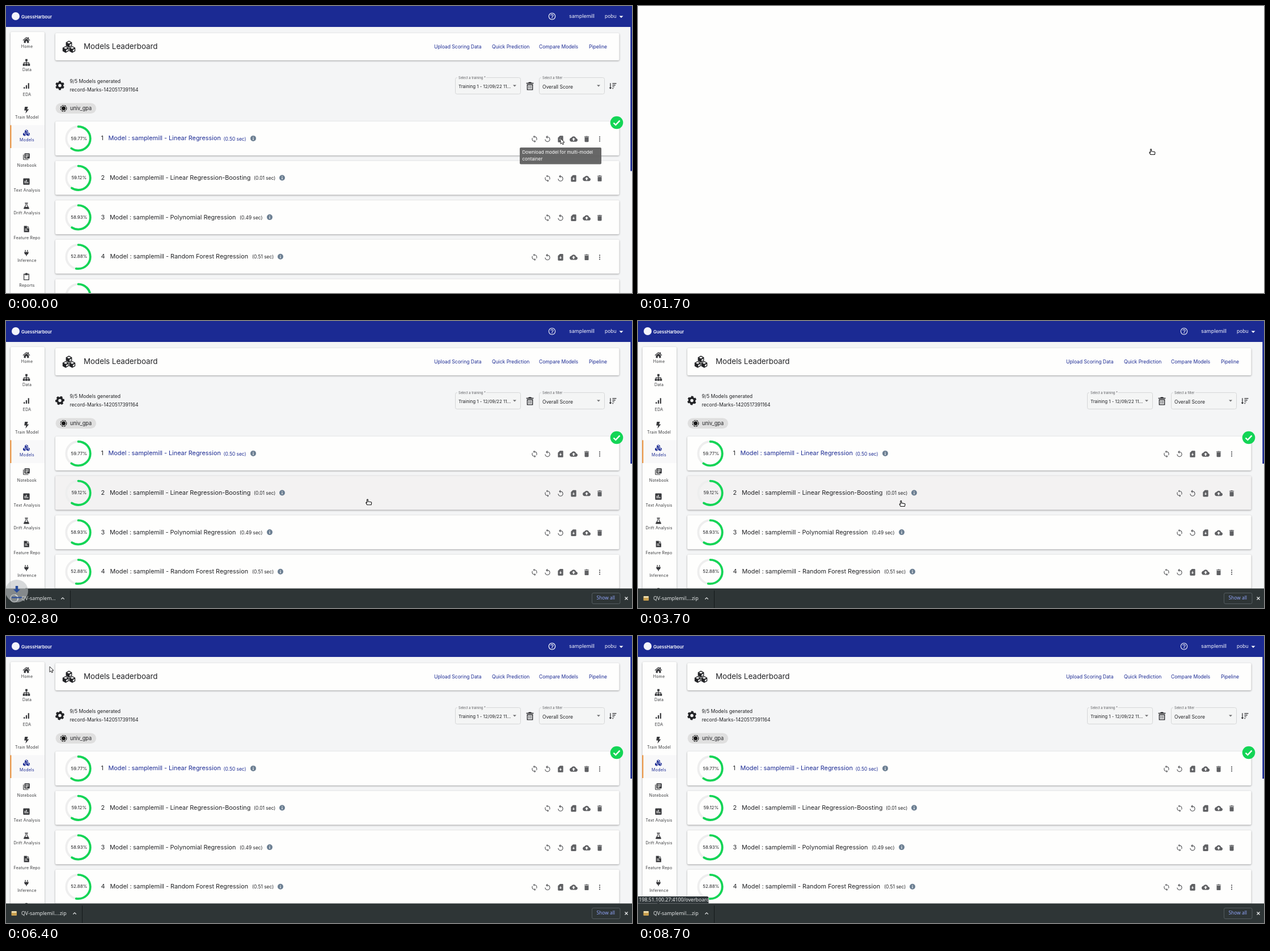
Animation, 1104 px wide and 507 px high, one loop 8800 ms. Source, as an HTML page with a canvas:

```html
<!DOCTYPE html>
<html lang="en">
<head>
<meta charset="utf-8">
<title>Models Leaderboard</title>
<style>
html, body { margin: 0; width: 100%; height: 100%; overflow: hidden; background: #fefefd; }
canvas { display: block; }
</style>
</head>
<body>
<canvas id="stage" width="1104" height="507"></canvas>
<script>
const ctx = document.getElementById('stage').getContext('2d');
const W = 1104, H = 507, LOOP = 8800, STEP = 100;
const SANS = 'Inter, sans-serif', UI = '"Noto Sans", sans-serif';
const NAVY = '#1b2a93', PAPER = '#fefefd', PAGE = '#f4f5f6', INK = '#222326', GREEN = '#13d556';
const BLANK_FROM = 1500, BLANK_TO = 2700, BAR_AT = 2800, DONE_AT = 3400;

// Icons on a 24 unit grid.
const ICONS = {
  loop: 'M12 4V1L8 5l4 4V6c3.31 0 6 2.69 6 6 0 1.01-.25 1.97-.7 2.8l1.46 1.46C19.54 15.03 20 13.57 20 12c0-4.42-3.58-8-8-8zm0 14c-3.31 0-6-2.69-6-6 0-1.01.25-1.97.7-2.8L5.24 7.74C4.46 8.97 4 10.43 4 12c0 4.42 3.58 8 8 8v3l4-4-4-4v3z',
  replay: 'M12 5V1L7 6l5 5V7c3.31 0 6 2.69 6 6s-2.69 6-6 6-6-2.69-6-6H4c0 4.42 3.58 8 8 8s8-3.58 8-8-3.58-8-8-8z',
  card: 'M18 2h-8L4 8v12c0 1.1.9 2 2 2h12c1.1 0 2-.9 2-2V4c0-1.1-.9-2-2-2zm-6 15l-4-4h3V9h2v4h3z',
  cloud: 'M19.35 10.04C18.67 6.59 15.64 4 12 4 9.11 4 6.6 5.64 5.35 8.04 2.34 8.36 0 10.91 0 14c0 3.31 2.69 6 6 6h13c2.76 0 5-2.24 5-5 0-2.64-2.05-4.78-4.65-4.96zM14 13v4h-4v-4H7l5-5 5 5h-3z',
  bin: 'M6 19c0 1.1.9 2 2 2h8c1.1 0 2-.9 2-2V7H6v12zM19 4h-3.5l-1-1h-5l-1 1H5v2h14V4z',
  more: 'M12 8a2 2 0 1 0 0-4 2 2 0 0 0 0 4zM12 14a2 2 0 1 0 0-4 2 2 0 0 0 0 4zM12 20a2 2 0 1 0 0-4 2 2 0 0 0 0 4z',
  info: 'M12 2a10 10 0 1 0 0 20 10 10 0 0 0 0-20zM13.3 17.5h-2.6V11h2.6zM13.300 9h-2.600V6.500h2.600z',
  help: 'M11 18h2v-2h-2v2zm1-16C6.480 2 2 6.480 2 12s4.480 10 10 10 10-4.480 10-10S17.520 2 12 2zm0 18c-4.410 0-8-3.590-8-8s3.590-8 8-8 8 3.590 8 8-3.590 8-8 8zm0-14c-2.210 0-4 1.790-4 4h2c0-1.100.900-2 2-2s2 .900 2 2c0 2-3 1.750-3 5h2c0-2.250 3-2.500 3-5 0-2.210-1.790-4-4-4z',
  home: 'M12 3 1 12.500l1.300 1.500L12 5.600l9.700 8.400 1.300-1.500-4-3.500V4h-3v2.500zM12 7.200 4.500 13.700V21H10v-5h4v5h5.500v-7.300z',
  tree: 'M9 2h6v6h-2v3h7v4h2v6h-6v-6h2v-2h-5v2h2v6H9v-6h2v-2H6v2h2v6H2v-6h2v-4h7V8H9z',
  bars: 'M3 16h4v5H3zM10 10h4v11h-4zM17 3h4v18h-4z',
  bolt: 'M7 1h10l-3 8h6L9 23l2-10H5z',
  books: 'M4 6H2v14c0 1.100.900 2 2 2h14v-2H4V6zm16-4H8c-1.100 0-2 .900-2 2v12c0 1.100.900 2 2 2h12c1.100 0 2-.900 2-2V4c0-1.100-.900-2-2-2zm-1 9H9V9h10v2zm-4 4H9v-2h6v2zm4-8H9V5h10v2z',
  chart: 'M19 3H5c-1.100 0-2 .900-2 2v14c0 1.100.900 2 2 2h14c1.100 0 2-.900 2-2V5c0-1.100-.900-2-2-2zM9 17H7v-7h2v7zm4 0h-2V7h2v10zm4 0h-2v-4h2v4z',
  flask: 'M7 2h10v2h-2v5l6 11c.5 1-.2 2-1.300 2H4.300C3.200 22 2.500 21 3 20L9 9V4H7zM11 4v5.500L8 15h8l-3-5.500V4z',
  file: 'M4 2h10v7h7v13H4zM15.500 2l5.500 5.500h-5.500zM7 11v2h7v-2zM7 15v2h9v-2z',
  plug: 'M7 2h2.500v6H7zM14.500 2H17v6h-2.500zM4 9h16v2h-1v2c0 3-2 5-5.500 5.700V23h-3v-4.300C7 18 5 16 5 13v-2H4z',
  clip: 'M9 2h6v2h5v18H4V4h5zM6 6v14h12V6h-2v2H8V6z',
  trash: 'M9 2h6l1 2h5v2H3V4h5zM4.500 7.500h15V22h-15zM6.500 9.500V20h11V9.500zM9 11h1.500v7.500H9zM13.500 11H15v7.500h-1.500z',
  sort: 'M4 4h2v13h3l-4 5-4-5h3zM11 4h12v2H11zM11 9h9v2h-9zM11 14h6v2h-6zM11 19h3v2h-3z',
  arrow: 'M0 0V11L2.600 8.700 4.300 12.300 6.200 11.400 4.600 7.900H8z',
  hand: 'M-.9 .9C-.9-.3 .9-.3 .9 .9V4L5.800 4.800C7 5 7.400 5.700 7.200 6.700L6.500 9.800H-.6L-2.500 6.600C-3 5.600-2 5-1.300 5.700L-.9 6.100z'
};
for (const name in ICONS) ICONS[name] = new Path2D(ICONS[name]);

const MENU = [
  ['Home', 'home', 60, 72, 14], ['Data', 'tree', 100, 112.5, 15], ['EDA', 'bars', 141, 157, 13],
  ['Train Model', 'bolt', 184, 197, 13], ['Models', 'cubes', 224, 237, 6],
  ['Notebook', 'books', 266, 281.5, 14], ['Text Analysis', 'chart', 310, 325.5, 15],
  ['Drift Analysis', 'flask', 353, 365.5, 13], ['Feature Repo', 'file', 394, 409.5, 13],
  ['Inference', 'plug', 436, 450, 12], ['Reports', 'clip', 478, 494, 15]
];
const ROWS = [
  { score: 59.77, name: 'Linear Regression', sec: '0.50', x: 180.5, secX: 383.5, infoX: 436, more: true },
  { score: 59.12, name: 'Linear Regression-Boosting', sec: '0.01', x: 183, secX: 437, infoX: 487 },
  { score: 58.93, name: 'Polynomial Regression', sec: '0.49', x: 183, secX: 412, infoX: 465 },
  { score: 52.88, name: 'Random Forest Regression', sec: '0.51', x: 183.5, secX: 434, infoX: 484, more: true },
  { score: 50.4, name: 'Decision Tree Regression', sec: '0.48', x: 183.5, secX: 434, infoX: 484 }
];
// Cursor stops: time, x, y, easing towards this stop.
const linear = s => s, smooth = s => s * s * (3 - 2 * s), slowing = s => 1 - (1 - s) ** 1.7;
const PATH = [
  [0, 978, 234, linear], [1400, 978, 234, linear], [2600, 684.5, 309, linear], [2800, 637.5, 315, linear],
  [4700, 376, 319, slowing], [6400, 77, 54, smooth], [7000, -14, 58, linear]
];

function text(str, x, y, size, color = INK, opt = {}) {
  ctx.font = `${opt.weight || 400} ${size}px ${opt.font || SANS}`;
  ctx.textAlign = opt.align || 'left';
  ctx.textBaseline = 'middle';
  ctx.letterSpacing = (opt.spacing || 0) + 'px';
  ctx.fillStyle = color;
  ctx.fillText(str, x, y);
}

function icon(name, x, y, size, color) {
  ctx.save();
  ctx.translate(x - size / 2, y - size / 2);
  ctx.scale(size / 24, size / 24);
  ctx.fillStyle = color;
  ctx.fill(ICONS[name], 'evenodd');
  ctx.restore();
}

function box(x, y, w, h, r, fill, stroke) {
  ctx.beginPath();
  ctx.roundRect(x, y, w, h, r);
  if (fill) { ctx.fillStyle = fill; ctx.fill(); }
  if (stroke) { ctx.strokeStyle = stroke; ctx.lineWidth = 1; ctx.stroke(); }
}

function panel(x, y, w, h, fill = PAPER) {
  ctx.save();
  ctx.shadowColor = 'rgba(0,0,0,.36)';
  ctx.shadowBlur = 3;
  ctx.shadowOffsetY = 1;
  box(x, y, w, h, 2, fill);
  ctx.restore();
}

function disc(x, y, r, color) {
  ctx.beginPath();
  ctx.arc(x, y, r, 0, Math.PI * 2);
  ctx.fillStyle = color;
  ctx.fill();
}

function ring(x, y, r, width, color, from = 0, part = 1) {
  ctx.beginPath();
  ctx.arc(x, y, r, from, from + part * Math.PI * 2);
  ctx.strokeStyle = color;
  ctx.lineWidth = width;
  ctx.stroke();
}

function line(color, width, ...points) {
  ctx.beginPath();
  for (let i = 0; i < points.length; i += 2) ctx.lineTo(points[i], points[i + 1]);
  ctx.strokeStyle = color;
  ctx.lineWidth = width;
  ctx.stroke();
}

function poly(color, ...points) {
  ctx.beginPath();
  for (let i = 0; i < points.length; i += 2) ctx.lineTo(points[i], points[i + 1]);
  ctx.fillStyle = color;
  ctx.fill();
}

function cube(x, y, r, color) {
  const w = r * .9, h = r / 2;
  poly(color, x, y - r, x + w, y - h, x + w, y + h, x, y + r, x - w, y + h, x - w, y - h);
  poly(PAPER, x, y - r * .72, x + w * .62, y - h * .86, x, y - r * .16, x - w * .62, y - h * .86);
  poly(PAPER, x + w * .2, y + r * .16, x + w * .76, y - h * .2, x + w * .76, y + h * .7, x + w * .2, y + r * .62);
}

function cubes(x, y, r, color) {
  cube(x, y - r * .78, r, color);
  cube(x - r * .97, y + r * .78, r, color);
  cube(x + r * .97, y + r * .78, r, color);
}

function gear(x, y, angle) {
  const teeth = 6, pitch = Math.PI * 2 / teeth;
  ctx.beginPath();
  for (let i = 0; i < teeth; i++) {
    const mid = angle - Math.PI / 2 + i * pitch;
    ctx.arc(x, y, 8, mid - .24, mid + .24);
    ctx.arc(x, y, 6.2, mid + .36, mid + pitch - .36);
  }
  ctx.closePath();
  ctx.moveTo(x + 2.7, y);
  ctx.arc(x, y, 2.7, 0, Math.PI * 2);
  ctx.fillStyle = INK;
  ctx.fill('evenodd');
}

function select(x, label, labelWidth, value, size) {
  box(x + .5, 126.5, 115, 29, 3, '#f4f5f5', '#d5d6d7');
  ctx.fillStyle = PAGE;
  ctx.fillRect(x + 4, 125, labelWidth, 3);
  text(label, x + 6, 127.5, 5.7, '#5c5d60');
  text(value, x + 6, 143, size);
  poly('#6b6c6e', x + 102, 139.5, x + 108, 139.5, x + 105, 142.5);
}

function header(t) {
  ctx.fillStyle = NAVY;
  ctx.fillRect(0, 0, W, 37);
  disc(17, 18, 7, '#f3f3fa');
  text('GuessHarbour', 27, 19.5, 7.7, '#fff', { weight: 600 });
  ctx.globalAlpha = .92 + .08 * Math.sin(t / 1000 * Math.PI * 2);
  icon('help', 963, 18.3, 15, '#fff');
  ctx.globalAlpha = 1;
  text('samplemill', 993, 18.5, 9, '#f2f3fb');
  text('pobu', 1056, 18.5, 8.5, '#f2f3fb');
  poly('#fff', 1081.5, 17.5, 1088.5, 17.5, 1085, 21);
}

function sidebar() {
  panel(8, 46, 60, 470);
  ctx.fillStyle = '#f8f8f9';
  ctx.fillRect(8, 210.5, 60, 40.5);
  ctx.fillStyle = '#ee8522';
  ctx.fillRect(7.5, 210.5, 1.8, 40.5);
  for (const [label, name, iconY, labelY, size] of MENU) {
    const color = name === 'cubes' ? NAVY : '#37383b';
    if (name === 'cubes') cubes(36, iconY, 3.2, color);
    else icon(name, 36, iconY, size, color);
    text(label, 37, labelY, 7, color, { align: 'center', spacing: .25 });
  }
}

function topPanel(t) {
  panel(87, 48, 994.5, 48);
  cubes(111, 72, 6, INK);
  text('Models Leaderboard', 137, 72, 13.3);
  [['Upload Scoring Data', 755], ['Quick Prediction', 857], ['Compare Models', 940], ['Pipeline', 1028]]
    .forEach(([label, x]) => text(label, x, 72.5, 8.55, NAVY));

  gear(95, 140.5, t / 2000 * Math.PI * 2);
  text('9/5 Models generated', 112.5, 133, 8.6);
  text('record-Marks-1420517391164', 112.5, 148, 8.6);
  select(792, 'Select a training *', 51, 'Training 1 - 12/09/22 11...', 7.9);
  icon('trash', 924, 141.5, 17, INK);
  select(940, 'Select a filter', 39, 'Overall Score', 8.5);
  icon('sort', 1070, 141, 14, INK);

  box(87.5, 171.5, 71.5, 18.5, 9.25, '#dfdfdf');
  disc(101.5, 180.8, 3.5, '#151515');
  ctx.setLineDash([3.2, 1.1]);
  ring(101.5, 180.8, 5.3, 1.2, '#151515');
  ctx.setLineDash([]);
  text('univ_gpa', 113, 181, 9.2);
}

const rowTop = i => 204 + i * 69.6;

function row(data, i, hovered) {
  const top = rowTop(i), y = top + 30.2;
  panel(87, top, 994.5, 60, hovered ? '#f3f2f2' : PAPER);
  ring(127.5, y, 21.2, 3.8, '#eeeeee');
  ctx.lineCap = 'round';
  ring(127.5, y, 21.2, 3.8, GREEN, -Math.PI / 2, data.score / 100);
  ctx.lineCap = 'butt';
  text(data.score.toFixed(2) + '%', 128.8, y, 7.9, INK, { align: 'center' });

  const color = i === 0 ? NAVY : INK;
  text(i + 1, 167.5, y, 10.85);
  text('Model : samplemill - ' + data.name, data.x, y, 10.85, color);
  text(`(${data.sec} sec)`, data.secX, y + .8, 8.4, color);
  icon('info', data.infoX, y - .3, 12, '#6c7f92');

  const actions = ['loop', 'replay', 'card', 'cloud', 'bin'];
  if (data.more) actions.push('more');
  actions.forEach((name, n) => icon(name, 1047 - 23 * (actions.length - 1 - n), y + .8, 14, '#5f6063'));
}

function tooltip() {
  box(906, 250, 144, 29.5, 2, 'rgba(97,97,97,.96)');
  text('Download model for multi-model', 910.5, 259, 8.05, '#fff');
  text('container', 910.5, 270.3, 8.05, '#fff');
}

function archive(x, y) {
  box(x - 4.5, y - 4, 9.5, 8, 1, '#c99f4e');
  box(x - 4, y - 4, 8.5, 3, 1, '#ecdcae');
}

function downloadBar(t) {
  const done = t >= DONE_AT, edge = done ? 134.5 : 113.5, chevron = edge - 13.5;
  ctx.fillStyle = '#2e3536';
  ctx.fillRect(0, 472.5, W, 35);
  line('#151a1b', 1, edge, 476, edge, H);
  line('#dfe2e3', 1.2, chevron - 2.7, 491.5, chevron, 488.8, chevron + 2.7, 491.5);

  if (done) {
    archive(14, 490);
    const pulse = (t - 3700) / 2500;
    if (pulse > 0 && pulse < 1) {
      ctx.globalAlpha = (1 - Math.cos(pulse * 10 * Math.PI)) / 2;
      ring(14.5, 490, 6.6, 1.6, '#dfe3e4');
      ctx.globalAlpha = 1;
    }
  } else {
    ring(14.5, 490, 6.6, 1.5, '#aeb3b5');
    ring(14.5, 490, 6.6, 1.8, '#f2f4f4', t / 160, .3);
  }
  text(done ? 'QV-samplemil....zip' : 'QV-samplem…', 27, 490, 8.9, '#e5e8e8', { font: UI });

  box(1033.5, 480.5, 49.5, 19, 2.5, null, '#535b5f');
  text('Show all', 1041.5, 490, 8.4, '#8fa3f8', { font: UI, weight: 500 });
  line('#e8eaea', 1.3, 1091.5, 487.5, 1096.5, 492.5);
  line('#e8eaea', 1.3, 1096.5, 487.5, 1091.5, 492.5);

  const drop = (t - BAR_AT) / 700;
  if (drop < 1) {
    ctx.globalAlpha = 1 - drop;
    disc(19, 477, 20, 'rgba(190,193,196,.6)');
    const y = 474 + drop * 12;
    ctx.fillStyle = '#274b9b';
    ctx.fillRect(16.8, y - 6, 4.4, 6);
    poly('#274b9b', 13, y, 25, y, 19, y + 6);
    ctx.fillRect(10, 487.5, 18, 2);
    ctx.globalAlpha = 1;
  }
}

function statusTip() {
  box(0, 460, 124.5, 12.5, [0, 3, 0, 0], '#30373a');
  text('198.51.100.27:4100/overboard', 1.5, 466.2, 8.7, '#e8eaea', { font: UI });
}

function cursorAt(t) {
  for (let i = 1; i < PATH.length; i++) {
    const [t0, x0, y0] = PATH[i - 1], [t1, x1, y1, ease] = PATH[i];
    if (t <= t1) {
      const s = ease((t - t0) / (t1 - t0));
      return { x: x0 + (x1 - x0) * s, y: y0 + (y1 - y0) * s };
    }
  }
  return null;
}

function cursor({ x, y }, hand) {
  ctx.save();
  ctx.translate(x, y);
  ctx.lineJoin = 'round';
  const shape = hand ? ICONS.hand : ICONS.arrow;
  ctx.fillStyle = hand ? '#fff' : '#111';
  ctx.strokeStyle = hand ? '#111' : '#fff';
  ctx.lineWidth = hand ? 1.1 : 1;
  if (hand) {
    ctx.fill(shape);
    ctx.stroke(shape);
  } else {
    // Dark rim with a white core.
    ctx.fillStyle = '#fff';
    ctx.strokeStyle = '#111';
    ctx.scale(.88, .88);
    ctx.fill(shape);
    ctx.stroke(shape);
  }
  ctx.restore();
}

function draw(t) {
  const pos = cursorAt(t);
  const blank = t >= BLANK_FROM && t < BLANK_TO;
  ctx.fillStyle = blank ? PAPER : PAGE;
  ctx.fillRect(0, 0, W, H);
  if (blank) return cursor(pos, true);

  const bar = t >= BAR_AT;
  const active = pos && t >= 500;
  const hovered = active && pos.x > 87
    ? ROWS.findIndex((_, i) => pos.y >= rowTop(i) && pos.y <= rowTop(i) + 60) : -1;
  const overMenu = active && pos.x < 68;

  sidebar();
  topPanel(t);
  ROWS.forEach((data, i) => row(data, i, i === hovered));
  disc(1077, 206, 11.3, GREEN);
  line('#fff', 2.4, 1071.5, 206.5, 1075.2, 210, 1082.5, 202.3);
  header(t);
  ctx.fillStyle = NAVY;
  ctx.fillRect(1101.3, 37, 2.7, bar ? 215 : 254.5);
  if (t < BLANK_FROM) tooltip();
  if (bar) downloadBar(t);
  if (t >= 6700) statusTip();
  if (pos) cursor(pos, hovered >= 0 || overMenu);
}

let shown = -1;
function tick() {
  const t = Math.floor(performance.now() % LOOP / STEP) * STEP;
  if (t !== shown) draw(shown = t);
  requestAnimationFrame(tick);
}
tick();
</script>
</body>
</html>
```
